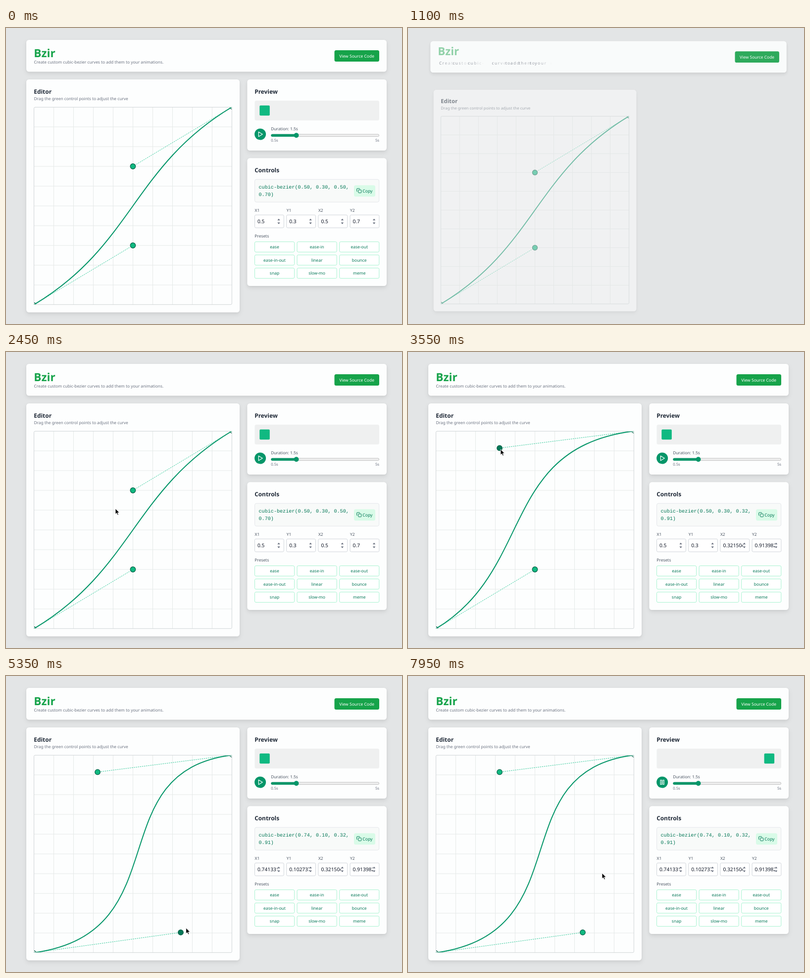
Animation, 800 px wide and 599 px high, one loop 8 s. Source, as an HTML page:

```html
<!DOCTYPE html>
<html lang="en">
<head>
<meta charset="utf-8">
<title>Bzir</title>
<style>
  html, body { margin: 0; width: 100%; height: 100%; overflow: hidden; background: #e3e5e6; }
  #stage { display: block; width: 100vw; height: 100vh; }
  text { font-family: "Noto Sans", "Open Sans", sans-serif; font-size: 8.4px; fill: #4b5563; white-space: pre; text-rendering: geometricPrecision; }
  .panel { fill: #fdfefe; filter: drop-shadow(0 4px 4px rgba(0,0,0,.08)) drop-shadow(0 1px 2px rgba(0,0,0,.06)); }
  .heading { font-size: 11.9px; font-weight: 700; fill: #1f2937; }
  .brand { font-size: 22.6px; font-weight: 800; fill: #16a34a; }
  .muted { font-size: 8.3px; fill: #6b7280; }
  .tiny { font-size: 7.7px; fill: #6b7280; }
  .code { font-family: "Liberation Mono", monospace; font-size: 10.15px; fill: #047857; }
  .value { font-size: 10.24px; fill: #111827; }
  .button { font-size: 8.5px; fill: #047857; text-anchor: middle; }
  .field { fill: #fff; stroke: #d1d5db; }
  .handle { stroke: #065f46; stroke-width: 1.2; }
  .arm { stroke: #34c99a; stroke-dasharray: 2.5 1.7; }
  .icon { fill: none; stroke: #fff; stroke-width: 1.2; stroke-linejoin: round; }
</style>
</head>
<body>
<svg id="stage" viewBox="0 0 800 599" preserveAspectRatio="none"></svg>
<script>
const LOOP = 8000, STEP = 50;
const stage = document.getElementById('stage');
const $ = id => document.getElementById(id);

const rect = (x, y, w, h, r, attrs) =>
  `<rect x="${x}" y="${y}" width="${w}" height="${h}" rx="${r}" ${attrs}/>`;
const text = (x, y, cls, body, attrs = '') =>
  `<text x="${x}" y="${y}" class="${cls}" ${attrs}>${body}</text>`;
const times = (n, fn) => Array.from({ length: n }, (_, i) => fn(i)).join('');

const panels = [
  { id: 'header', x: 41, y: 24, w: 728, h: 64.5, start: 730 },
  { id: 'editor', x: 41, y: 104, w: 431, h: 471.5, start: 930 },
  { id: 'preview', x: 487.3, y: 104, w: 281.7, h: 144, start: 1130 },
  { id: 'controls', x: 487.3, y: 263.3, w: 281.7, h: 258.7, start: 1330 }
];

// Every letter slides in by its place in its word; the last word trails.
const letters = [];
const words = 'Create custom cubic-bezier curves to add them to your animations.'.split(' ');
words.forEach((word, w) => {
  const last = w === words.length - 1;
  [...word].forEach((char, i) => letters.push({ char, start: 810 + i * 50 + (last ? 280 : 0) }));
  if (!last) letters.push({ char: ' ', start: 0 });
});

const content = {
  header: `
    <g id="brand">${text(56.3, 59.3, 'brand', 'Bzir')}</g>
    <text id="tagline" x="56.5" y="72.2" class="muted">${letters.map(l => `<tspan>${l.char}</tspan>`).join('')}</text>
    ${rect(663.5, 45, 90.5, 23, 3.5, 'fill="#16a34a"')}
    ${text(708.6, 59.5, 'button', 'View Source Code', 'style="fill:#fff"')}`,

  editor: `
    ${text(56.3, 132.5, 'heading', 'Editor')}
    ${text(56.5, 146, 'muted', 'Drag the green control points to adjust the curve')}
    <svg x="56.4" y="160" width="400" height="400">
      <path d="${times(9, i => `M${40 * i + 40} 0V400M0 ${40 * i + 40}H400`)}" stroke="#e5e9e8" fill="none"/>
      <g fill="#fff" stroke="#065f46" stroke-width="1.3"><circle cy="400" r="4"/><circle cx="400" r="4"/></g>
      <path id="arm1" class="arm"/><path id="arm2" class="arm"/>
      <path id="curve" fill="none" stroke="#059669" stroke-width="2"/>
      <circle id="handle1" class="handle" r="5.3"/><circle id="handle2" class="handle" r="5.3"/>
    </svg>
    ${rect(56.5, 160.3, 399.8, 399.4, 2.5, 'fill="none" stroke="#cfd4d6"')}`,

  preview: `
    ${text(502.2, 132.5, 'heading', 'Preview')}
    ${rect(502.4, 147, 251.6, 40, 3.5, 'fill="#eff0f0"')}
    ${rect(512.3, 156.7, 20.5, 20.5, 2, 'id="box" fill="#10b981"')}
    <circle id="playButton" cx="513.6" cy="215" r="11.5"/>
    <path id="playIcon" class="icon" d="M510.3 210.2L518.2 215L510.3 219.8Z"/>
    <path id="pauseIcon" class="icon" d="M510 210.5h2.5v9h-2.5zM514.7 210.5h2.5v9h-2.5z"/>
    ${text(535.2, 206.5, 'muted', 'Duration: 1.5s', 'style="fill:#4b5563"')}
    ${rect(535.8, 215, 217.8, 4.6, 2.3, 'fill="#efefef" stroke="#b2b2b2" stroke-width=".8"')}
    ${rect(535.4, 214.7, 51, 5.2, 2.6, 'fill="#059669"')}
    <circle cx="586.5" cy="217.3" r="5" fill="#059669"/>
    ${text(535.2, 230, 'tiny', '0.5s')}
    ${text(754, 230, 'tiny', '5s', 'text-anchor="end"')}`,

  controls: `
    ${text(502.2, 291.7, 'heading', 'Controls')}
    ${rect(502.5, 306.3, 251.2, 46, 3.5, 'fill="#f8faf9" stroke="#e5e7eb"')}
    ${text(510.5, 324.5, 'code', '', 'id="code1"')}${text(510.5, 339.7, 'code', '', 'id="code2"')}
    ${rect(703, 318.3, 43, 23, 3.5, 'fill="#d9fbe8"')}
    <g fill="none" stroke="#047857">${rect(711.8, 327.6, 6, 6, 1, '')}<path d="M709.8 330.8h-.4q-.7 0-.7-.7v-4.4q0-.8.8-.8h4.6q.7 0 .7.7v.5"/></g>
    ${text(720.2, 332.6, '', 'Copy', 'style="font-size:8.7px;fill:#047857"')}
    ${['X1', 'Y1', 'X2', 'Y2'].map((label, i) => {
      const x = 502.5 + i * 64.2;
      return text(x, 372.3, '', label) + rect(x, 378.3, 58.8, 26, 2.5, 'class="field"') +
        `<svg x="${x + 4}" y="379" width="42" height="25">${text(1.5, 16, 'value', '', `id="value${i}"`)}</svg>` +
        `<path d="M${x + 45.8} 389.2l2.7-3.4 2.7 3.4zM${x + 45.8} 393.6l2.7 3.4 2.7-3.4z" fill="#6b7280"/>`;
    }).join('')}
    ${text(502.3, 424, '', 'Presets')}
    ${['ease', 'ease-in', 'ease-out', 'ease-in-out', 'linear', 'bounce', 'snap', 'slow-mo', 'meme'].map((name, i) => {
      const x = 502.5 + (i % 3) * 85.6, y = 432.6 + Math.floor(i / 3) * 26.6;
      return rect(x, y, 80.1, 20.8, 2.5, 'fill="#fff" stroke="#a7f3d0"') + text(x + 40, y + 13.4, 'button', name);
    }).join('')}`
};

stage.innerHTML = panels.map(p =>
  `<g id="${p.id}">${rect(p.x, p.y, p.w, p.h, 5.5, 'class="panel"')}${content[p.id]}</g>`).join('') + `
  <g id="cursor" stroke="#fff" stroke-width=".8">
    <path id="arrow" d="M0 0V11.2L2.6 8.8 4.5 13 6.3 12.2 4.5 8.1H8Z"/>
    <path id="hand" d="M-1 0.3C-1-1 1.2-1 1.2 .3V4.6L6 5.8Q7 6.2 7 7.4V9.5L5.8 13H.4L-3.2 8Q-3.6 6.6-2.2 6.8L-1 7.8Z"/>
  </g>
  <rect id="blank" width="800" height="599" fill="#fff"/>`;
const tagline = [...$('tagline').children];

// Rows of [time, x, y]
const cursorPath = [
  [2250, 197, 372], [2450, 221, 317], [2900, 257, 280], [3100, 257, 280], [3550, 187, 197],
  [3650, 187, 197], [3900, 333, 302], [4400, 259, 443], [4650, 259, 443], [4800, 282, 446],
  [5300, 361, 521], [5450, 369, 488], [6250, 514, 214], [6350, 507, 216], [6600, 507, 216],
  [7400, 372, 388], [7950, 392, 399]
];
const path1 = [[4650, .5, .3], [4800, .539301, .296861], [5300, .7413317, .1027373]];
const path2 = [[3100, .5, .7], [3550, .3215046, .9139823]];

function follow(keys, t) {
  const next = keys.findIndex(k => k[0] > t);
  if (next === 0) return keys[0].slice(1);
  if (next < 0) return keys[keys.length - 1].slice(1);
  const a = keys[next - 1], b = keys[next], p = (t - a[0]) / (b[0] - a[0]);
  return [a[1] + (b[1] - a[1]) * p, a[2] + (b[2] - a[2]) * p];
}

// Critically damped spring, 0 to 1
function spring(t, start) {
  const s = Math.max(0, t - start) / 100;
  return 1 - (1 + s) * Math.exp(-s);
}

function bezier(x, x1, y1, x2, y2) {
  const axis = (s, a, b) => 3 * (1 - s) ** 2 * s * a + 3 * (1 - s) * s * s * b + s ** 3;
  let low = 0, high = 1;
  for (let i = 0; i < 30; i++) {
    const mid = (low + high) / 2;
    if (axis(mid, x1, x2) < x) low = mid; else high = mid;
  }
  return axis(low, y1, y2);
}

const between = (t, a, b) => t >= a && t < b;
const show = (id, on) => $(id).setAttribute('visibility', on ? 'visible' : 'hidden');

function drawIntro(t) {
  for (const { id, x, y, w, h, start } of panels) {
    const p = spring(t, start), cx = x + w / 2, cy = y + h / 2;
    $(id).setAttribute('opacity', p);
    $(id).setAttribute('transform',
      `translate(${cx} ${cy + 19.2 * (1 - p)}) scale(${.9 + .1 * p}) translate(${-cx} ${-cy})`);
  }
  const brand = spring(t, 930);
  $('brand').setAttribute('opacity', brand);
  $('brand').setAttribute('transform', `translate(0 ${-12.8 * (1 - brand)})`);

  let previous = 0;
  letters.forEach(({ start }, i) => {
    const left = (1 - Math.min(1, Math.max(0, (t - start) / 400))) ** 1.3;
    tagline[i].setAttribute('dx', 12.8 * left - previous);
    tagline[i].setAttribute('fill-opacity', 1 - left);
    previous = 12.8 * left;
  });
}

function drawCurve(t) {
  const values = [...follow(path1, t), ...follow(path2, t)];
  const [x1, y1, x2, y2] = values.map((v, i) => i % 2 ? 400 - 400 * v : 400 * v);
  $('curve').setAttribute('d', `M0 400C${x1} ${y1} ${x2} ${y2} 400 0`);
  $('arm1').setAttribute('d', `M0 400L${x1} ${y1}`);
  $('arm2').setAttribute('d', `M400 0L${x2} ${y2}`);
  const place = (id, x, y, hover) => {
    $(id).setAttribute('transform', `translate(${x} ${y})`);
    $(id).setAttribute('fill', hover ? '#047857' : '#10b981');
  };
  place('handle1', x1, y1, between(t, 4350, 5400));
  place('handle2', x2, y2, between(t, 2850, 3700));

  const short = values.map(v => v.toFixed(2));
  $('code1').textContent = `cubic-bezier(${short.slice(0, 3).join(', ')},`;
  $('code2').textContent = `${short[3]})`;
  values.forEach((v, i) => { $('value' + i).textContent = +v.toFixed(7); });
  return values;
}

function draw(t) {
  show('blank', between(t, 150, 550));
  drawIntro(t < 150 ? 1e5 : t);
  const values = drawCurve(t);

  const playing = t >= 6600;
  const progress = playing ? bezier((t - 6600) / 1500, ...values) : 0;
  $('box').setAttribute('transform', `translate(${211.5 * progress} 0)`);
  $('playButton').setAttribute('fill', between(t, 6350, 6750) ? '#047857' : '#059669');
  show('playIcon', !playing);
  show('pauseIcon', playing);

  const pointing = between(t, 6350, 6700);
  $('cursor').setAttribute('transform', `translate(${follow(cursorPath, t)})`);
  show('arrow', t >= 2250 && !pointing);
  show('hand', pointing);
}

const begin = performance.now();
function tick() {
  const t = (performance.now() - begin) % LOOP;
  draw(Math.floor(t / STEP) * STEP);
  requestAnimationFrame(tick);
}
tick();
</script>
</body>
</html>
```
